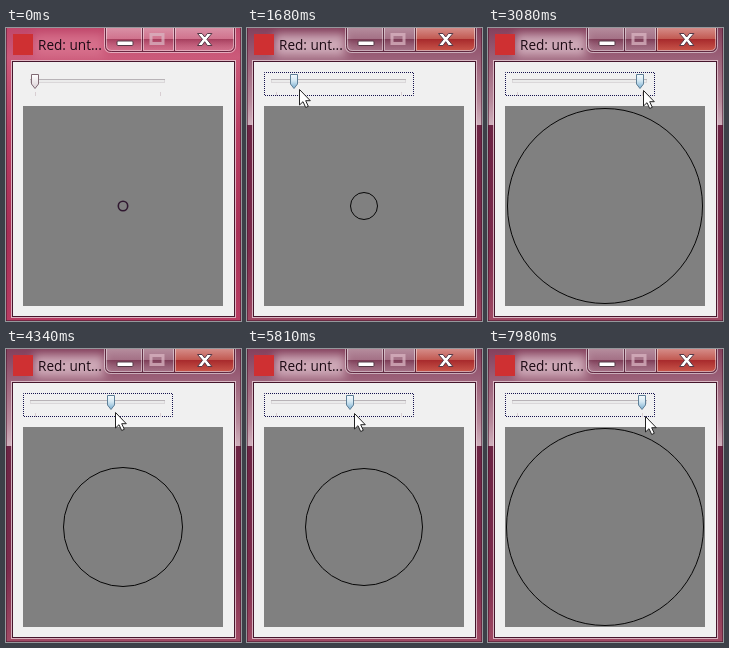
Animation, 235 px wide and 293 px high, one loop 8000 ms. Source, as an HTML page:

```html
<!DOCTYPE html>
<html lang="en">
<head>
<meta charset="utf-8">
<title>Slider and circle</title>
<style>
html, body { margin: 0; width: 100%; height: 100%; overflow: hidden; background: #a03358; }
svg { display: block; width: 235px; height: 293px; }
text { font: 13.6px "Open Sans", "Noto Sans", sans-serif; fill: #1c0a14; }
.active .off, svg:not(.active) .on { display: none; }
#ring { fill: none; stroke: #301830; stroke-width: 1.6; }
.active #ring { stroke: #000; stroke-width: .95; }
#thumb path { fill: url(#plain); stroke: #806a74; }
#thumb.hot path { fill: url(#hot); stroke: #5f7f96; }
#focus { fill: none; stroke: #15124e; stroke-dasharray: 1 1; stroke-dashoffset: .5; }
</style>
</head>
<body>
<svg id="stage" viewBox="0 0 235 293">
  <defs>
    <linearGradient id="idle" x2="0" y2="1">
      <stop offset="0" stop-color="#c0476a"/><stop offset=".1" stop-color="#cb5a7a"/>
      <stop offset=".35" stop-color="#b93c62"/><stop offset=".7" stop-color="#a82f56"/>
      <stop offset="1" stop-color="#b83c62"/>
    </linearGradient>
    <linearGradient id="glass" x2="0" y2="1">
      <stop offset="0" stop-color="#84405c"/><stop offset=".1" stop-color="#9a6078"/>
      <stop offset=".25" stop-color="#b88a9c"/><stop offset=".33" stop-color="#cfb0bc"/>
      <stop offset=".33" stop-color="#6c2444"/><stop offset=".75" stop-color="#7c2b4c"/>
      <stop offset="1" stop-color="#a04a64"/>
    </linearGradient>
    <linearGradient id="button" x2="0" y2="1">
      <stop offset="0" stop-color="#fff" stop-opacity=".4"/><stop offset=".5" stop-color="#fff" stop-opacity=".2"/>
      <stop offset=".5" stop-color="#501028" stop-opacity=".25"/><stop offset="1" stop-color="#fff" stop-opacity=".15"/>
    </linearGradient>
    <linearGradient id="close" x2="0" y2="1">
      <stop offset="0" stop-color="#d58c88"/><stop offset=".48" stop-color="#c25a52"/>
      <stop offset=".5" stop-color="#a82a2c"/><stop offset="1" stop-color="#c8554a"/>
    </linearGradient>
    <linearGradient id="plain" x2="0" y2="1">
      <stop offset="0" stop-color="#fff"/><stop offset="1" stop-color="#dcd2d7"/>
    </linearGradient>
    <linearGradient id="hot" x2="0" y2="1">
      <stop offset="0" stop-color="#f4f9fc"/><stop offset=".45" stop-color="#d3e7f2"/>
      <stop offset="1" stop-color="#78add0"/>
    </linearGradient>
    <filter id="blur" x="-30%" y="-60%" width="160%" height="220%"><feGaussianBlur stdDeviation="5"/></filter>
    <clipPath id="panel"><path d="M17 78h200v200h-200z"/></clipPath>
  </defs>

  <!-- window frame -->
  <path class="off" fill="url(#idle)" d="M0 0h235v293h-235z"/>
  <path class="on" fill="url(#glass)" d="M0 0h235v293h-235z"/>
  <rect class="off" x="28" y="6" width="70" height="22" fill="#e58ba2" opacity=".5" filter="url(#blur)"/>
  <rect class="on" x="28" y="6" width="70" height="22" fill="#e6ccd6" opacity=".7" filter="url(#blur)"/>
  <path d="M.5 0v293M234.5 0v293M0 292.5h235" stroke="#4c1830" stroke-opacity=".6"/>
  <rect x="7" y="6" width="20" height="21" fill="#cf3032"/>
  <text x="32" y="22">Red: unt...</text>

  <!-- caption buttons -->
  <path fill="url(#button)" d="M100 0h68v22.500h-63q-5 0-5-5z"/>
  <path class="off" fill="url(#button)" d="M168 0h60v17.500q0 5-5 5h-55z"/>
  <path class="on" fill="url(#close)" d="M168 0h60v17.500q0 5-5 5h-55z"/>
  <path fill="none" stroke="#fff" stroke-opacity=".5" d="M98.500 0v18q0 6.500 6.500 6.500h118q6.500 0 6.500-6.500v-18"/>
  <path fill="none" stroke="#511c34" stroke-opacity=".8" d="M99.500 0v17.500q0 6 6 6h117q6 0 6-6v-17.500M136.500 0v23M168.500 0v23"/>
  <path fill="none" stroke="#fff" stroke-opacity=".45" d="M100.500 0v17.500q0 5 5 5h30v-22.500M137.500 0v22.500h30v-22.500M169.500 0v22.500h53q5 0 5-5v-17.500"/>
  <rect x="111" y="13" width="16" height="4.500" rx="1" fill="#fff" stroke="#553846"/>
  <path fill="none" stroke="#d9b4c2" stroke-opacity=".75" stroke-width="3" d="M145 6.500h12v9h-12z"/>
  <g fill="#fff" stroke="#553846">
    <path d="M191.500 5.500h4.500l2.700 3.500l2.700-3.500h4.500l-5 5.800l5 6.200h-4.500l-2.700-3.800l-2.700 3.800h-4.500l5-6.200z"/>
  </g>

  <!-- client area -->
  <rect x="5.500" y="32.500" width="224" height="257" fill="none" stroke="#e9cfd8" stroke-opacity=".8"/>
  <rect x="6.500" y="33.500" width="222" height="255" fill="#f0f0f0" stroke="#46162c"/>
  <path fill="#808080" d="M17 78h200v200h-200z"/>
  <g clip-path="url(#panel)"><circle id="ring" cx="117" cy="178"/></g>

  <!-- slider -->
  <rect id="focus" class="on" x="17.500" y="44.500" width="149" height="23"/>
  <rect x="24.500" y="51.500" width="134" height="3" fill="#ebebeb" stroke="#dad7d9"/>
  <path d="M24 51.500h135" stroke="#b8b3b7"/>
  <path d="M29.500 64v4M154.500 64v4" stroke="#d8ced2"/>
  <g id="thumb"><path d="M-3.500 46.500h7v9.500l-3.500 4.500l-3.500-4.500z"/></g>

  <path id="cursor" fill="#fff" stroke="#222" d="M.5.5v15.500l3.500-3.300l2.700 5.800l2.600-1.200l-2.600-5.600h4.600z"/>
</svg>
<script>
const $ = id => document.getElementById(id);
const LOOP = 8000, STEP = 70;

// turns of the drag: [time, percent]; past 100 only the pointer goes on
const turns = [
  [1330, 0], [2660, 91], [2870, 91], [3080, 98], [3220, 147], [3360, 108], [3710, 108],
  [4760, 36], [5250, 81], [5390, 81], [5850, 59], [6230, 102], [6580, 65], [6650, 65],
  [7000, 102], [7070, 102], [7420, 61], [7700, 57], [7980, 99]
];

const ease = p => (1 - Math.cos(Math.PI * p)) / 2;

function valueAt(t) {
  const i = turns.findIndex(k => k[0] >= t);
  if (i <= 0) return turns[0][1];
  const [t0, v0] = turns[i - 1], [t1, v1] = turns[i];
  return v0 + (v1 - v0) * ease((t - t0) / (t1 - t0));
}

const move = (el, x, y) => el.setAttribute("transform", `translate(${Math.round(x)} ${Math.round(y)})`);

function draw(t) {
  const v = valueAt(t), level = Math.min(100, Math.floor(v));
  // at first the pointer comes up from the lower right
  const away = Math.max(0, (840 - t) / 770) ** 1.4;
  $("stage").classList.toggle("active", t >= 1120);
  $("thumb").classList.toggle("hot", t >= 770);
  $("ring").setAttribute("r", Math.max(4.7, level - .5));
  $("cursor").style.display = t < 70 ? "none" : "";
  move($("thumb"), 29.4 + 1.255 * level, 0);
  move($("cursor"), 33.4 + 1.245 * v + 121 * away, 61 + 6 * (t / LOOP) ** 2 + 204 * away);
}

const start = performance.now();
function tick() {
  const t = (performance.now() - start) % LOOP;
  draw(Math.floor(t / STEP) * STEP);
  requestAnimationFrame(tick);
}
tick();
</script>
</body>
</html>
```
